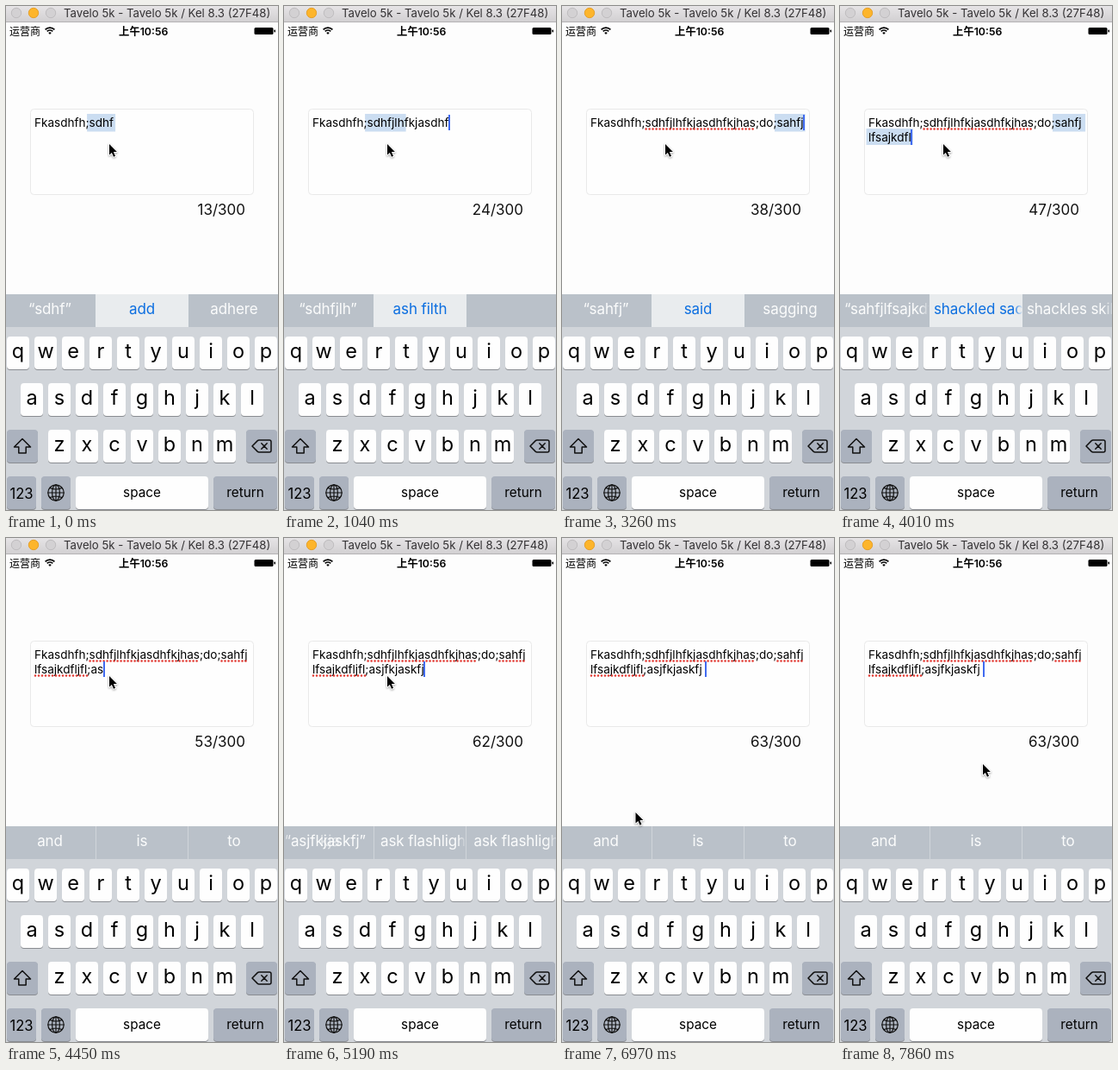
An HTML page that plays this animation: 316x584 px, repeating every 8000 ms.

```html
<!DOCTYPE html>
<html lang="zh">
<head>
<meta charset="utf-8">
<title>Typing with word suggestions</title>
<style>
  html, body { margin: 0; width: 316px; height: 584px; overflow: hidden; background: #fdfdfd; }
  svg { display: block; }
  text { font-family: Inter, "Noto Sans CJK SC", "Noto Sans CJK", sans-serif; white-space: pre; }
  .mid { text-anchor: middle; }
  .letter { font-size: 23.5px; font-weight: 400; }
  .word { font-size: 15.3px; }
  .digits { font-size: 16.6px; }
  .body { font-size: 13.55px; }
  .hint { font-size: 17px; letter-spacing: -.1px; fill: #fbfcfc; }
  .hint.on { fill: #0d6fe0; }
  .line { fill: none; stroke: #111; stroke-width: 1.5; stroke-linejoin: round; stroke-linecap: round; }
  .dots { fill: none; stroke: #e33a33; stroke-width: 2.6; stroke-linecap: round; stroke-dasharray: 0 4; }
  #mouse { filter: drop-shadow(0 1px 1px rgba(0, 0, 0, .35)); }
</style>
</head>
<body>
<svg id="stage" width="316" height="584" viewBox="0 0 316 584">
  <defs>
    <linearGradient id="chrome" x2="0" y2="1">
      <stop stop-color="#e6e4e6"/><stop offset="1" stop-color="#d2d0d2"/>
    </linearGradient>
    <linearGradient id="fade" gradientUnits="userSpaceOnUse" x2="316"></linearGradient>
    <mask id="edges" maskUnits="userSpaceOnUse" x="0" y="334" width="316" height="38">
      <rect y="334" width="316" height="38" fill="url(#fade)"/>
    </mask>
  </defs>

  <rect width="316" height="584" fill="#fdfdfd"/>
  <rect width="316" height="18" fill="url(#chrome)"/>
  <rect y="18" width="316" height="1" fill="#b4b2b4"/>
  <g stroke-width="1">
    <circle cx="12" cy="8" r="5.7" fill="#d3d1d3" stroke="#bfbdbf"/>
    <circle cx="32" cy="8" r="5.7" fill="#fdb52b" stroke="#e5a02a"/>
    <circle cx="52" cy="8" r="5.7" fill="#d3d1d3" stroke="#bfbdbf"/>
  </g>
  <text x="67" y="13" font-size="13.2" fill="#333133">Tavelo 5k - Tavelo 5k / Kel 8.3 (27F48)</text>

  <text x="4" y="34" font-size="12">运营商</text>
  <path d="M45.6 27.4A7.6 7.6 0 0 1 56.4 27.4M47.7 29.4A4.6 4.6 0 0 1 54.3 29.4" fill="none" stroke="#000" stroke-width="1.7"/>
  <path d="M49.2 31.1A2.5 2.5 0 0 1 52.8 31.1L51 33Z"/>
  <text x="159.7" y="33.5" class="mid" font-size="12.3" font-weight="600">上午10:56</text>
  <rect x="288.5" y="25" width="22" height="8" rx="1.5"/>
  <rect x="311.5" y="27.5" width="1.5" height="3" rx=".7"/>

  <rect x="28.5" y="119.5" width="259" height="99" rx="4" fill="#fefefe" stroke="#e9e9e9"/>
  <g id="marks" fill="#cbddf1"></g>
  <text id="row0" class="body" x="33" y="140"/>
  <text id="row1" class="body" x="33" y="157"/>
  <path id="wavy" class="dots"/>
  <rect id="caret" width="2" height="18" fill="#416bf0"/>
  <text id="count" x="278" y="241.7" font-size="17" text-anchor="end" fill="#111"/>

  <rect y="334" width="316" height="38" fill="#bac1c9"/>
  <rect id="pick" x="104" y="334" width="108" height="38" fill="#e9ecee"/>
  <path id="rules" d="M104.5 334V372M211.5 334V372" stroke="#d0d5da"/>
  <g id="hints" mask="url(#edges)"></g>

  <rect y="372" width="316" height="212" fill="#d1d5da"/>
  <g id="keys"></g>
  <path class="line" d="M19 501.5L28.5 511H23.2V518H14.8V511H9.5Z"/>
  <path class="line" d="M286 510L292.3 503.6Q293 503 294 503H306Q308 503 308 505V515Q308 517 306 517H294Q293 517 292.3 516.4ZM296.8 506.8L303.2 513.2M303.2 506.8L296.8 513.2"/>
  <g class="line" style="stroke-width:1.2">
    <circle cx="58" cy="564" r="9.2"/>
    <ellipse cx="58" cy="564" rx="4.4" ry="9.2"/>
    <path d="M58 554.8V573.2M48.8 564H67.2M51 558.4Q58 561.6 65 558.4M51 569.6Q58 566.4 65 569.6"/>
  </g>
  <path id="mouse" d="M.5 1V13.6L3.4 10.9L5.5 15.7L7.5 14.8L5.4 10.1H9.4Z" stroke="#fff" stroke-width="2" paint-order="stroke" stroke-linejoin="round"/>
</svg>
<script>
const $ = id => document.getElementById(id);
function add(parent, tag, attrs, text) {
  const el = document.createElementNS('http://www.w3.org/2000/svg', tag);
  for (const name in attrs) el.setAttribute(name, attrs[name]);
  if (text) el.textContent = text;
  return parent.appendChild(el);
}
const set = (id, attrs) => { for (const name in attrs) $(id).setAttribute(name, attrs[name]); };

// Keyboard
const BASELINE = { letter: 24.6, word: 24.3, digits: 25.8 };
function key(x, y, w, label, cls, dark) {
  const box = { x, width: w, height: 38, rx: 4 };
  add($('keys'), 'rect', { ...box, y: y + 1, fill: '#898c91' });
  add($('keys'), 'rect', { ...box, y, fill: dark ? '#abb2be' : '#fefefe' });
  if (label) add($('keys'), 'text', { x: x + w / 2, y: y + BASELINE[cls], class: 'mid ' + cls }, label);
}
[['qwertyuiop', 1], ['asdfghjkl', 17], ['zxcvbnm', 49]].forEach(([row, x], r) =>
  [...row].forEach((c, i) => key(x + 32 * i, 383 + 54 * r, 26, c, 'letter')));
key(1, 491, 36, '', '', true);
key(279, 491, 36, '', '', true);
key(1, 545, 34, '123', 'digits', true);
key(41, 545, 34, '', '', true);
key(81, 545, 154, 'space', 'word');
key(241, 545, 74, 'return', 'word', true);

// Suggestion slots, softened at their edges
[[0, .3], [8, 1], [94, 1], [104, 0], [108, 1], [202, 1], [212, 0], [216, 1], [306, 1], [316, .3]].forEach(([x, o]) =>
  add($('fade'), 'stop', { offset: x / 316, 'stop-color': '#fff', 'stop-opacity': o }));
const slots = [[0, 104], [104, 212], [212, 316]].map(([a, b]) => {
  const box = add($('hints'), 'svg', { x: a, y: 334, width: b - a, height: 38, viewBox: `${a} 334 ${b - a} 38`, overflow: 'hidden' });
  return add(box, 'text', { class: 'hint', y: 357 });
});
const ghost = add($('hints'), 'text', { class: 'hint', x: 42, y: 357, opacity: .6 }, 'kja');

// Tracks are keyed by tick
const TICK = 148.25, LOOP = 8000;
const LINES = ['Fkasdhfh;sdhfjlhfkjasdhfkjhas;do;sahfj', 'lfsajkdfljfl;asjfkjaskfj '];
const BREAK = LINES[0].length;
const WRONG = [[9, 29], [33, 50]];
const typed = [[0, 13], [7, 24], [14, 37], [20, 37], [21, 38], [27, 47], [35, 62], [43, 62], [44, 63]];
const marked = [[0, 9, 13], [3, 9, 16], [8, 0, 0], [14, 33, 99], [28, 0, 0]];
const blink = [[0, 0], [1, 1], [15, .5], [16, 0], [18, .5], [19, 1], [38, .4], [39, 0], [40, 1], [48, 0], [50, 1]];
const path = [[0, 119.5, 159], [38, 119.5, 159], [39, 92, 228], [40, 55, 320], [41, 31.5, 367], [42, 56.5, 350],
  [45, 56.5, 350], [47, 85, 317], [51, 174, 222], [52, 171, 240], [53, 165.5, 261]];
const scroll = [[0, 0], [36, 0], [41, 1]];
const hints = [
  [0, '“sdhf”|add|adhere', true],
  [3, '“sdhfjlh”|ash filth|', true],
  [9, '“sdhfjlhfkjasdhf”||'],
  [11, 'and|is|to'],
  [12, '“do”|dog|done'],
  [14, '“sahf”|said|sagging', true],
  [21, '“sahfj”|said|sagging', true],
  [26, '“sahfjlfsajkdfl”|shackled sack|shackles skill', true],
  [29, 'and|is|to'],
  [31, '“as”|ask|asks'],
  [33, '“asjf”|ask|asks'],
  [35, '“asjfkjaskfj”|ask flashlight|ask flashlights'],
  [44, 'and|is|to'],
];

const hold = (track, k) => track.filter(s => s[0] <= k).pop();
function lerp(track, k) {
  const a = hold(track, k), b = track.find(s => s[0] > k) || a;
  const p = a === b ? 0 : (k - a[0]) / (b[0] - a[0]);
  return a.slice(1).map((v, i) => v + (b[i + 1] - v) * p);
}

const pen = document.createElement('canvas').getContext('2d');
function width(text, size) {
  pen.font = size + 'px Inter, sans-serif';
  return pen.measureText(text).width;
}
const xAt = (row, n) => 33 + width(LINES[row].slice(0, n), 13.55);

// Pieces of a character range, one per line it touches
function pieces(from, to) {
  return [0, 1].map(row => {
    const a = Math.max(from - row * BREAK, 0);
    const b = Math.min(to - row * BREAK, LINES[row].length);
    return b > a && { row, x0: xAt(row, a), x1: xAt(row, b), wraps: !row && to > BREAK };
  }).filter(Boolean);
}

function drawHints(k) {
  const [, words, on] = hold(hints, k);
  const [slide] = lerp(scroll, k);
  const scrolling = k >= 35 && k < 44;
  const starts = scrolling ? [.5, 112 - 18 * slide, 220.5 - 28.5 * slide] : [5, 109, 217];
  words.split('|').forEach((word, i) => {
    const long = width(word, 17) > 93;
    slots[i].textContent = word;
    slots[i].setAttribute('x', long ? starts[i] : 51 + 107 * i);
    slots[i].setAttribute('text-anchor', long ? 'start' : 'middle');
    slots[i].classList.toggle('on', i === 1 && !!on);
  });
  ghost.style.display = k === 35 ? '' : 'none';
  $('pick').style.display = on ? '' : 'none';
  $('rules').style.display = on ? 'none' : '';
}

function draw(k) {
  const n = Math.round(lerp(typed, k)[0]);
  $('row0').textContent = LINES[0].slice(0, n);
  $('row1').textContent = LINES[1].slice(0, Math.max(0, n - BREAK));
  $('count').textContent = n + '/300';

  const [, from, to] = hold(marked, k);
  $('marks').replaceChildren();
  for (const p of pieces(from, Math.min(to, n))) {
    add($('marks'), 'rect', {
      x: p.x0 - 2.5, y: 125 + 17 * p.row, height: p.row ? 19 : 20.5,
      width: p.x1 - p.x0 + (p.wraps ? 7 : 4.5),
    });
  }
  const wavy = WRONG.filter(w => n > w[1]).flatMap(w => pieces(...w));
  set('wavy', { d: wavy.map(p => `M${p.x0 + 1} ${142.5 + 17 * p.row}H${p.x1}`).join('') });

  const row = n > BREAK ? 1 : 0;
  set('caret', { x: Math.round(xAt(row, n - row * BREAK) - .6), y: 126 + 17 * row, opacity: hold(blink, k)[1] });
  set('mouse', { transform: `translate(${lerp(path, k)})` });
  drawHints(k);
}

let last = -1;
function frame() {
  const k = Math.floor(performance.now() % LOOP / TICK);
  if (k !== last) draw(last = k);
  requestAnimationFrame(frame);
}
frame();
</script>
</body>
</html>
```
